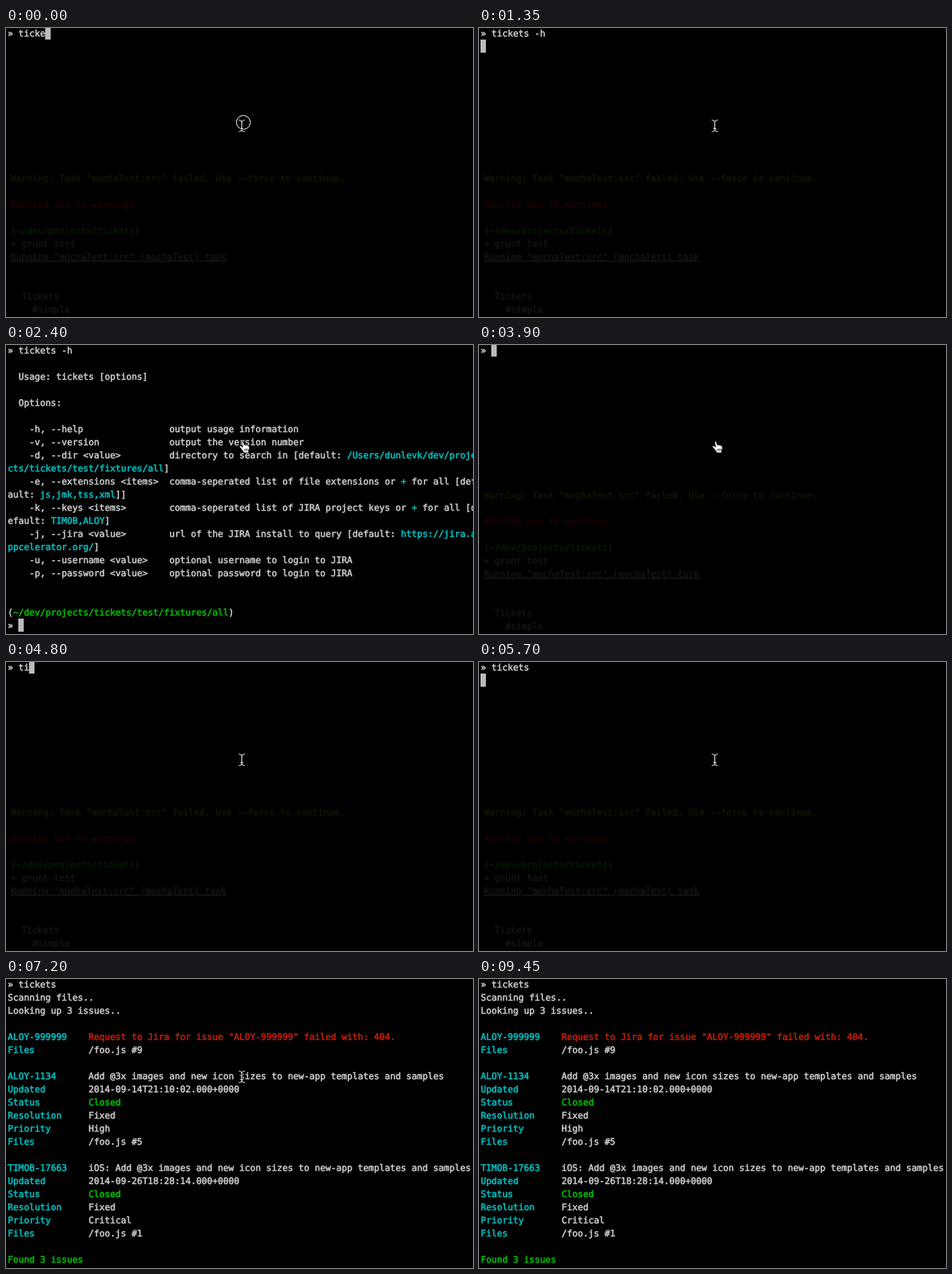
An HTML page that plays this animation: 607x375 px, repeating every 9710 ms.

```html
<!DOCTYPE html>
<html lang="en">
<head>
<meta charset="utf-8">
<title>tickets</title>
<style>
  html, body { margin: 0; width: 100%; height: 100%; overflow: hidden; background: #000; }
  svg { display: block; }
  text {
    font: 11.635px "DejaVu Sans Mono", "Liberation Mono", monospace;
    white-space: pre; text-rendering: geometricPrecision;
    color: #d0d0d0; stroke-width: .5;
  }
  text, tspan { fill: currentColor; stroke: currentColor; }
  .c { color: #00c5c7; }
  .g { color: #00c200; }
  .r { color: #cf1c06; }
  #ghost text { color: #151515; }
  #ghost .y { color: #141405; }
  #ghost .r { color: #1c0404; }
  #ghost .g { color: #041b04; }
  .u { text-decoration: underline; }
</style>
</head>
<body>
<svg width="607" height="375" viewBox="0 0 607 375">
  <defs>
    <path id="beamShape" d="M-3-7.5Q-.5-7.3 .5-5.2Q1.5-7.3 4-7.5M.5-5.2V5.2M-3 7.5Q-.5 7.3 .5 5.2Q1.5 7.3 4 7.5M-1 3.5H2"/>
  </defs>
  <g id="ghost" transform="translate(6.3 188)"></g>
  <rect id="cover" width="607"/>
  <rect id="block" width="7" height="17" fill="#bbb"/>
  <g id="screen" transform="translate(2.3 0)"></g>
  <circle id="ring" cx="308.5" cy="122.5" r="9" fill="none" stroke="#fff"/>
  <g id="beam" fill="none" stroke-linecap="round">
    <use href="#beamShape" stroke="#000" stroke-width="2.6"/>
    <use href="#beamShape" stroke="#e6e6e6" stroke-width="1.1"/>
  </g>
  <g id="hand" transform="translate(303 124.5)" stroke="#000" stroke-width=".8" stroke-linejoin="round">
    <path fill="#fff" d="M3.2 1.2Q4.4-.4 5.5 1.2L7 5.4Q8.2 4.4 9 5.6Q10.4 4.8 11.2 6.2Q12.8 5.8 13.2 7.4
      Q13.8 10 12.4 12.6V15.4H5.8V14Q3.6 12 2.4 9.8L.4 7.8Q.2 6 2 6.2L4.6 8Z"/>
    <path d="M7.5 10V13M9.3 10V13M11.1 10V13"/>
  </g>
</svg>
<script>
const LOOP = 9710, ROW = 17, COL = 7, HEIGHT = 375;
const $ = id => document.getElementById(id);

// {c|text} colours a run of text.
const HELP = `
  Usage: tickets [options]

  Options:

    -h, --help                output usage information
    -v, --version             output the version number
    -d, --dir <value>         directory to search in [default: {c|/Users/dunlevk/dev/proje}
{c|cts/tickets/test/fixtures/all}]
    -e, --extensions <items>  comma-seperated list of file extensions or {c|+} for all [def
ault: {c|js,jmk,tss,xml}]]
    -k, --keys <items>        comma-seperated list of JIRA project keys or {c|+} for all [d
efault: {c|TIMOB,ALOY}]
    -j, --jira <value>        url of the JIRA install to query [default: {c|https://jira.a}
{c|ppcelerator.org/}]
    -u, --username <value>    optional username to login to JIRA
    -p, --password <value>    optional password to login to JIRA


({g|~/dev/projects/tickets/test/fixtures/all})
»`.split("\n");

const field = (name, value) => `{c|${name.padEnd(15)}}${value}`;
const issue = (key, title, updated, priority, line) => [
  field(key, title),
  field("Updated", updated),
  field("Status", "{g|Closed}"),
  field("Resolution", "Fixed"),
  field("Priority", priority),
  field("Files", "/foo.js #" + line),
  ""
];
const TITLE = "Add @3x images and new icon sizes to new-app templates and samples";
const RESULTS = [
  "Scanning files..",
  "Looking up 3 issues..",
  "",
  field("ALOY-999999", '{r|Request to Jira for issue "ALOY-999999" failed with: 404.}'),
  field("Files", "/foo.js #9"),
  "",
  ...issue("ALOY-1134", TITLE, "2014-09-14T21:10:02.000+0000", "High", 5),
  ...issue("TIMOB-17663", "iOS: " + TITLE, "2014-09-26T18:28:14.000+0000", "Critical", 1),
  "{g|Found 3 issues}"
];
const GHOST = [
  '{y|Warning: Task "mochaTest:src" failed. Use --force to continue.}',
  "",
  "{r|Aborted due to warnings.}",
  "",
  "({g|~/dev/projects/tickets})",
  "» grunt test",
  '{u|Running "mochaTest:src" (mochaTest) task}',
  "",
  "",
  "  Tickets",
  "    #simple"
];

// Steps: start time, command, output lines, cursor row, height of the area hiding the backdrop.
const STEPS = [
  [0, "ticke", [], 0, 0],
  [150, "ticket", [], 0, 0],
  [300, "tickets ", [], 0, 0],
  [450, "tickets -", [], 0, 0],
  [750, "tickets -h", [], 0, 0],
  [1350, "tickets -h", [], 1, 0],
  [1500, "tickets -h", HELP, 21, HEIGHT],
  [3900, "", [], 0, 0],
  [4650, "t", [], 0, 0],
  [4800, "ti", [], 0, 0],
  [4950, "tick", [], 0, 0],
  [5100, "ticke", [], 0, 0],
  [5250, "tickets", [], 0, 0],
  [5700, "tickets", [], 1, 0],
  [6000, "tickets", RESULTS.slice(0, 2), 3, 0],
  [6600, "tickets", RESULTS.slice(0, 5), 6, 0],
  [6900, "tickets", RESULTS.slice(0, 12), 13, 236],
  [7200, "tickets", RESULTS, 23, HEIGHT]
];

const markup = line => line
  .replace(/</g, "&lt;")
  .replace(/\{(\w)\|([^}]*)\}/g, '<tspan class="$1">$2</tspan>');

function print(group, lines) {
  group.innerHTML = lines
    .map((line, row) => line && `<text y="${row * ROW + 11}">${markup(line)}</text>`)
    .join("");
}

function showStep([, command, output, row, covered]) {
  print($("screen"), ["» " + command, ...output]);
  const col = row === 0 ? 2 + command.length : output === HELP ? 2 : 0;
  $("block").setAttribute("x", 2 + col * COL);
  $("block").setAttribute("y", row * ROW - 2);
  $("cover").setAttribute("height", covered);
}

const show = (id, on) => $(id).setAttribute("visibility", on ? "visible" : "hidden");

function showPointer(t) {
  const hand = t >= 2400 && t < 4350;
  const moves = Math.max(0, Math.floor((t - 8700) / 150) + 1);
  const p = (moves / 5) ** 1.5;
  show("ring", t < 150);
  show("hand", hand);
  show("beam", !hand && moves < 6);
  $("beam").setAttribute("transform", `translate(${306 + 261 * p} ${127 + 241 * p})`);
}

const start = performance.now();
let current;
function frame() {
  const t = (performance.now() - start) % LOOP;
  const step = STEPS.findLast(s => s[0] <= t);
  if (step !== current) showStep(current = step);
  showPointer(t);
  requestAnimationFrame(frame);
}

print($("ghost"), GHOST);
frame();
</script>
</body>
</html>
```
